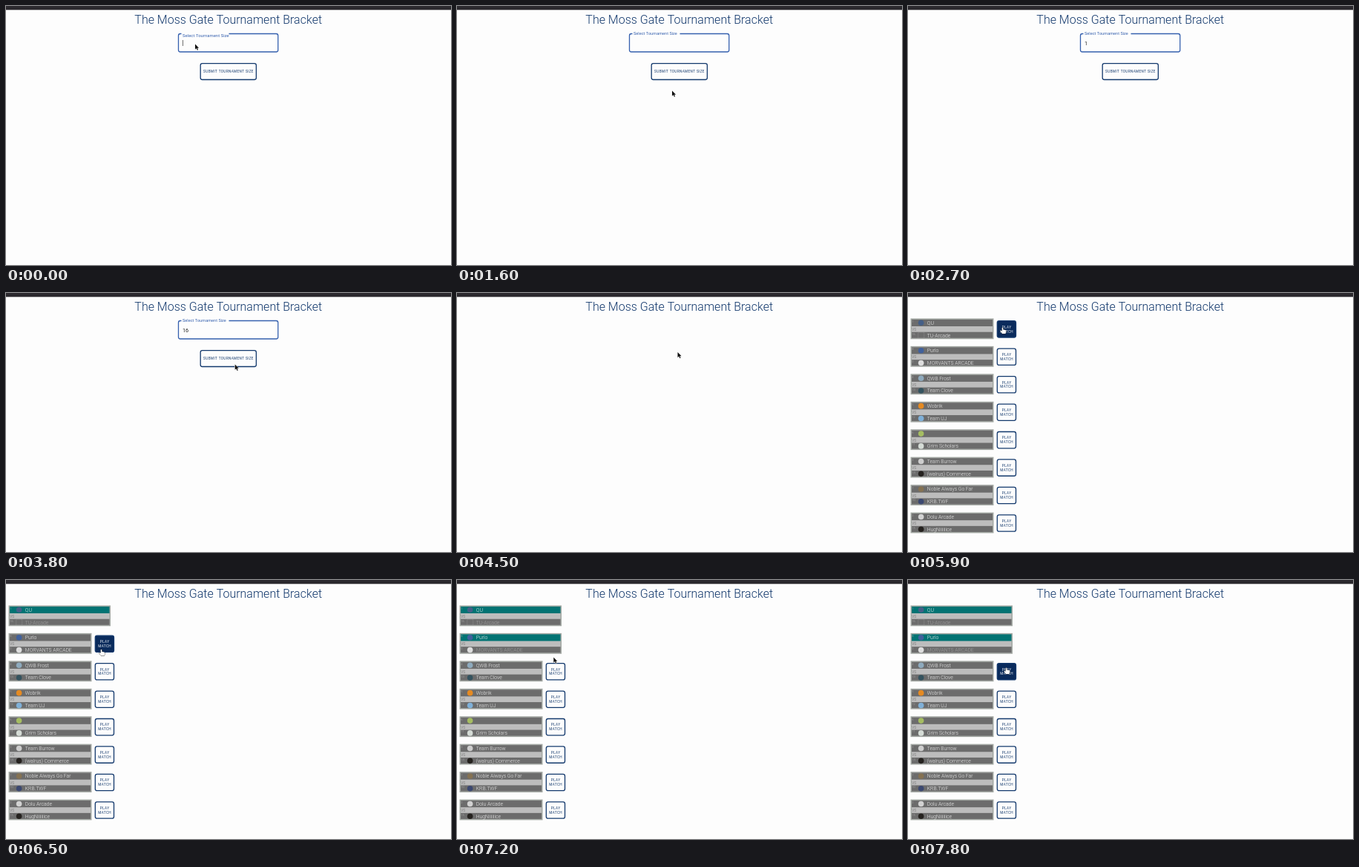
Animation of 600 by 350 pixels, one loop 8 s. Source, as an HTML page with a canvas:

```html
<!DOCTYPE html>
<html lang="en">
<head>
<meta charset="utf-8">
<title>Tournament Bracket</title>
<style>
html, body { margin: 0; width: 100%; height: 100%; overflow: hidden; background: #fdfdfd; }
canvas { display: block; width: 600px; height: 350px; }
</style>
</head>
<body>
<canvas id="stage"></canvas>
<script>
const LOOP = 8000, STEP = 100;
const FORM_GONE = 4400, BRACKET_SHOWN = 4700;
const NAVY = '#12386c', BLUE = '#3560ae', PAPER = '#fdfdfd';
const SANS = 'Roboto, "Liberation Sans", sans-serif';
const ROW_GAP = 37.45;

// Each match: [seed, name, logo colour] for both teams
const matches = [
  [[1, 'QU', '#455f86'], [16, 'TU-Arcade', null]],
  [[8, 'Purlo', '#41619c'], [9, 'MORVANTS ARCADE', '#dedede']],
  [[4, 'QWB Frost', '#8eaabd'], [13, 'Team Clove', '#34535f']],
  [[5, 'Wobrik', '#e58a22'], [12, 'Team UJ', '#7fb0d8']],
  [[6, '', '#a5bd62'], [11, 'Grim Scholars', '#d5dcd6']],
  [[3, 'Team Burrow', '#cdcdcd'], [14, '(walrus) Commerce', '#25221f']],
  [[7, 'Noble Always Go Far', '#857253'], [10, 'KRB.TWF', '#3b4870']],
  [[2, 'Dolu Arcade', '#d2d2d2'], [15, 'HugNiiiiiice', '#25221f']]
];
const playedAt = [6200, 7000];

// Pointer path: [time, x, y]
const path = [
  [0, 255, 51.5], [100, 255, 51.5], [500, 290, 114.5], [3300, 290, 114.5],
  [3500, 304, 123], [3800, 308.7, 96.6], [4000, 305, 88], [4250, 305, 88],
  [4500, 297.5, 80], [4900, 297.5, 80], [5600, 127.5, 46.5], [6100, 127.5, 46.5],
  [6450, 128.5, 93.8], [6950, 128.5, 93.8], [7500, 132.5, 118.5], [LOOP, 132.5, 118.5]
];

const canvas = document.getElementById('stage');
const ctx = canvas.getContext('2d');
const scale = window.devicePixelRatio || 1;
canvas.width = 600 * scale;
canvas.height = 350 * scale;

const mix = (a, b, k) => a + (b - a) * k;

function pointerAt(t) {
  const i = path.findIndex(p => p[0] > t);
  const [t0, x0, y0] = path[i - 1], [t1, x1, y1] = path[i];
  const u = (t - t0) / (t1 - t0), k = u * u * (3 - 2 * u);
  return { x: mix(x0, x1, k), y: mix(y0, y1, k) };
}

function rect(x, y, w, h, color) {
  ctx.fillStyle = color;
  ctx.fillRect(x, y, w, h);
}

function text(str, x, y, size, color, { weight = 400, align = 'left', spacing = 0 } = {}) {
  ctx.font = `${weight} ${size}px ${SANS}`;
  ctx.letterSpacing = spacing + 'px';
  ctx.textAlign = align;
  ctx.fillStyle = color;
  ctx.fillText(str, x, y);
}

function roundBox(x, y, w, h, fill, stroke) {
  ctx.beginPath();
  ctx.roundRect(x, y, w, h, 2.5);
  ctx.fillStyle = fill;
  ctx.fill();
  ctx.lineWidth = 1.3;
  ctx.strokeStyle = stroke;
  ctx.stroke();
}

// Draws a button and tells whether the pointer is over it
function button(x, y, w, h, lines, pointer) {
  const pad = 3;
  const hover = pointer.x > x + pad && pointer.x < x + w - pad &&
                pointer.y > y + pad && pointer.y < y + h - pad;
  roundBox(x, y, w, h, hover ? '#0a2b5c' : PAPER, NAVY);
  lines.forEach((line, i) => {
    const baseline = y + h / 2 + 1.7 + (i - (lines.length - 1) / 2) * 5.9;
    text(line, x + w / 2 + 0.2, baseline, 4.7, hover ? '#f2f5fa' : NAVY, { align: 'center', spacing: 0.36 });
  });
  return hover;
}

function drawForm(t, pointer) {
  roundBox(232.5, 37.5, 134.3, 24.5, PAPER, BLUE);
  rect(236.5, 36, 64, 3, PAPER);
  const shrink = Math.min(1, 0.78 + t / 450);
  text('Select Tournament Size', 238, mix(52.5, 39, shrink), mix(7.3, 5.5, shrink), BLUE, { spacing: 0.05 });

  const value = t < 2000 ? '' : t < 2900 ? '1' : '16';
  const typedAt = [0, 2000, 2900][value.length];
  text(value, 238, 52.6, 7.3, '#222');
  if ((t - typedAt) % 1000 < 500) rect(238.2 + value.length * 4.1, 46, 0.7, 8, '#333');

  return button(262.2, 77.7, 75.2, 21.8, ['SUBMIT TOURNAMENT SIZE'], pointer);
}

function drawLogo(color, y) {
  if (color) {
    ctx.fillStyle = color;
    ctx.beginPath();
    ctx.arc(17.6, y, 3.8, 0, 7);
    ctx.fill();
  } else {
    ctx.strokeStyle = '#a2a2a2';
    ctx.lineWidth = 0.6;
    ctx.setLineDash([1, 1]);
    ctx.strokeRect(13.7, y - 4, 8, 8);
    ctx.setLineDash([]);
  }
}

function drawMatch(teams, row, t, pointer) {
  const top = 34.4 + row * ROW_GAP;
  const played = t >= playedAt[row];
  const width = played ? 137.5 : 112;
  rect(3.5, top, width, 27.9, '#a3a8a3');
  rect(5, top + 1.5, width - 3, 24.9, '#bdbdbd');
  teams.forEach(([seed, name, logo], i) => {
    const y = top + 1.5 + i * 16.8;
    const lost = played && i === 1;
    rect(5, y, width - 3, i ? 8.1 : 9.1, played && i === 0 ? '#027373' : '#6c6c6c');
    text(seed, 5.3, y + 3.9, 4, '#b5b5b5', { weight: 300 });
    const index = row * 2 + i;
    if (index < 3 || t >= 4800 + index * 40) drawLogo(logo, y + 4.4);
    text(name, 25.8, y + 6.8, 6.8, lost ? '#a0a0a0' : '#f0f0f0', { weight: 300 });
  });
  text('VS', 5.2, top + 16.4, 4.8, '#666', { weight: 300 });
  return !played && button(120.3, top + 3.3, 25.2, 22.3, ['PLAY', 'MATCH'], pointer);
}

function drawPointer({ x, y }, hand) {
  const shape = new Path2D(hand
    ? 'M-.8 .5Q0-.7 .8 .5V3L4 3.6Q5 4 4.8 5.5L4 8.5H-.5L-3 5.3Q-3 4-1.8 4.6L-.8 5.3Z'
    : 'M0 0V7.2L1.7 5.6L2.9 8.3L4.1 7.8L2.9 5.2H5.1Z');
  ctx.save();
  ctx.translate(x, y);
  ctx.lineJoin = 'round';
  ctx.lineWidth = hand ? 0.7 : 1;
  ctx.strokeStyle = hand ? '#111' : '#fff';
  ctx.fillStyle = hand ? '#fff' : '#111';
  ctx.stroke(shape);
  ctx.fill(shape);
  ctx.restore();
}

function draw(t) {
  ctx.setTransform(scale, 0, 0, scale, 0, 0);
  rect(0, 0, 600, 350, PAPER);
  rect(0, 0, 600, 5.3, '#2b292e');
  text('The Moss Gate Tournament Bracket', 299.7, 23.7, 16, NAVY, { weight: 300, align: 'center' });

  const pointer = pointerAt(t);
  let hover = false;
  if (t < FORM_GONE) hover = drawForm(t, pointer);
  if (t >= BRACKET_SHOWN) {
    matches.forEach((teams, row) => {
      hover = drawMatch(teams, row, t, pointer) || hover;
    });
  }
  // The pointer hides while typing
  if (t < 2000 || t >= 3400) drawPointer(pointer, hover);
}

function tick() {
  const t = performance.now() % LOOP;
  draw(Math.floor(t / STEP) * STEP);
  requestAnimationFrame(tick);
}
tick();
</script>
</body>
</html>
```
